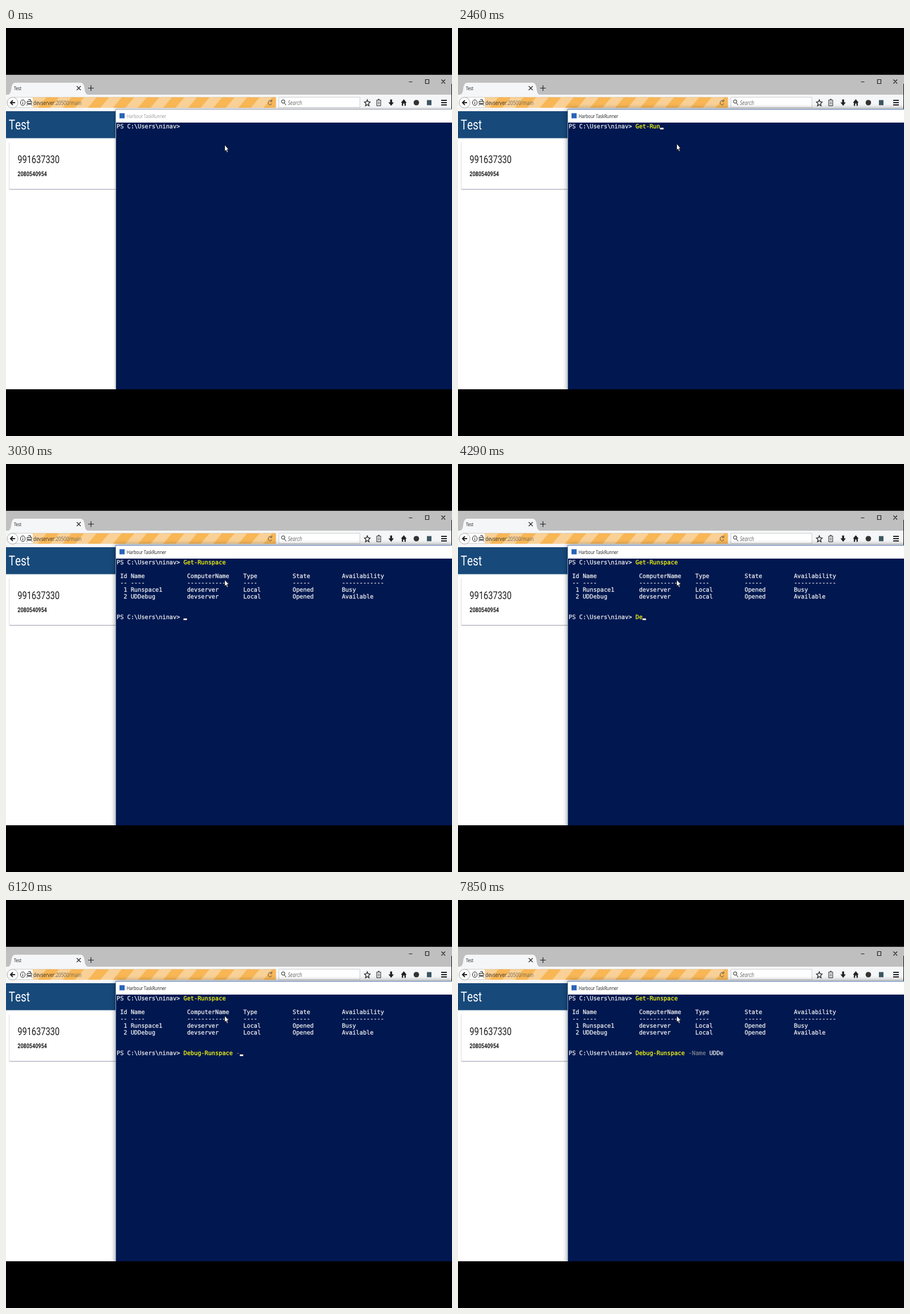
Recreate the animation shown at these times as an HTML page. Size 782 by 716 pixels, loop 8000 ms.

```html
<!DOCTYPE html>
<html lang="en">
<head>
<meta charset="utf-8">
<title>Console beside a browser</title>
<style>
  html, body { margin: 0; width: 100%; height: 100%; overflow: hidden; background: #000; }
  svg { display: block; width: 782px; height: 716px; }
  text { white-space: pre; text-rendering: geometricPrecision; }
  .ui { font-family: "Open Sans", sans-serif; }
  .page { font-family: Roboto, sans-serif; font-kerning: none; }
  .console { font: 10.25px "DejaVu Sans Mono", monospace; fill: #f2f1f0; }
  .console text { stroke: currentColor; stroke-width: .25; color: #f2f1f0; }
  .line { fill: none; stroke: #222; stroke-width: 1.2; }
  .console .command { fill: #ffff10; stroke: #ffff10; }
  .console .option { fill: #7d828c; stroke: #7d828c; }
  #shell { filter: drop-shadow(0 0 2px #0005); }
  #shell.active { filter: drop-shadow(0 0 4px #0007); }
  #frame { fill: #b4b8c2; }
  .active #frame { fill: #7f9cc8; }
  #caption { fill: #999; }
  .active #caption { fill: #1a1a1a; }
</style>
</head>
<body>
<svg viewBox="0 0 782 716">
  <defs>
    <pattern id="stripes" width="44" height="19" patternUnits="userSpaceOnUse" x="451" y="121.5">
      <path fill="#f9d197" d="M0 0h44v19H0z"/>
      <path fill="#f8b655" d="M16 0h22L22 19H0z"/>
    </pattern>
  </defs>

  <!-- browser -->
  <path fill="#bfbfbf" d="M0 82h782v36H0z"/>
  <path fill="#a4a4a4" d="M0 82h782v1H0z"/>
  <path fill="#f5f6f7" d="M0 117h4q4-1 5-9 1-12 7-12h115q6 0 7 12 1 8 5 9h639v29H0z"/>
  <path class="line" d="M124 102l7 7m0-7l-7 7M149 100.5v10m-5-5h10M706.500 94.500h6M763.500 90.500l6.500 7m0-7l-6.500 7M735.500 90.500h6v7h-6z"/>
  <path fill="#fff" stroke="#d0d0d0" d="M12 121.500h461v18H12zM478.500 121.500h142v18h-142z"/>
  <path fill="url(#stripes)" d="M47 121.500h426v18.500H47z"/>
  <circle cx="11.500" cy="131" r="9.500" fill="#fcfcfc" stroke="#aaa"/>
  <path class="line" d="M16 131H8m4-4l-4 4 4 4" style="stroke-width:2"/>
  <g class="line" style="stroke-width:1">
    <ellipse cx="29.500" cy="131" rx="4" ry="5"/>
    <path d="M29.500 130v4m0-6v1M37 128.500h8v4h-8zM39 125.500h4v3M36 136l2-2h6l2 2M39 130.500h1m2 0h1"/>
    <path stroke="#555" d="M465.500 128.500a3.300 4 0 1 0 .5 4m0-7v3.500h-3"/>
    <circle cx="486" cy="129" r="3"/>
    <path d="M488 131.500l3 4M650 126.500h7v10h-7zM652 125h3M651.500 130h4m-4 3h4"/>
    <path style="stroke-width:1.3" d="M633.500 126l1.400 3.500 3.600.4-2.700 2.700.8 3.900-3.100-2-3.100 2 .8-3.900-2.700-2.700 3.600-.4z"/>
  </g>
  <path fill="#222" d="M673.500 125.500h3.500v5h3l-4.700 6-4.800-6h3zM697.500 125l5 6h-1.500v5.500h-2.300v-4h-2.400v4H694V131h-1.500z"/>
  <circle cx="719.500" cy="131" r="4.800" fill="#333"/>
  <path fill="#3c5660" d="M738 126.500h8v9h-8z"/>
  <path class="line" style="stroke-width:2" d="M763 127h10m-10 4h10m-10 4h10"/>
  <path fill="#111" d="M781 98h1v48h-1z"/>

  <!-- page -->
  <path fill="#fff" d="M0 146h782v488H0z"/>
  <path fill="#17497a" d="M0 146h194v47.500H0z"/>
  <path fill="#d9dde2" d="M0 193.500h194v1H0z"/>
  <path fill="#dcdce0" d="M5 201h1v82H5z"/>
  <path fill="#a9a9bc" d="M6 282.500h188v1.300H6z"/>

  <!-- the recording is squeezed sideways as a whole -->
  <g transform="scale(.78 1)">
    <g class="ui">
      <text x="18" y="109" font-size="8.800" fill="#111">Test</text>
      <text x="61.500" y="135" font-size="10.400" fill="#333">devserver<tspan fill="#6b6255">:20500/main</tspan></text>
      <text x="633.500" y="135" font-size="10.800" font-style="italic" fill="#666">Search</text>
    </g>
    <g class="page" fill="#1c1c1c">
      <text x="6" y="178" font-size="24.200" fill="#fff">Test</text>
      <text x="26" y="237" font-size="18.700">991637330</text>
      <text x="26" y="260" font-size="11.500" font-weight="bold">2080540954</text>
    </g>
  </g>

  <!-- console window -->
  <g id="shell">
    <path id="frame" d="M192 142h601v500H192z"/>
    <path fill="#fff" d="M193 143.500h600V166H193z"/>
    <path fill="#001750" d="M193 166h600v476H193z"/>
    <path fill="#2a64b8" d="M199 149.500h9v9h-9z"/>
    <text id="caption" class="ui" transform="scale(.78 1)" x="271.500" y="157.500" font-size="9.200">Harbour TaskRunner</text>
  </g>
  <g class="console">
    <text x="194" y="176">PS C:\Users\ninav&gt; <tspan id="first" class="command"></tspan></text>
    <g id="table"></g>
    <text id="prompt" x="194" y="272">PS C:\Users\ninav&gt; <tspan id="command" class="command"></tspan><tspan id="option" class="option"></tspan><tspan id="value"></tspan></text>
    <rect id="caret" width="6" height="3" fill="#fbf1e6"/>
  </g>
  <path id="pointer" fill="#fff" stroke="#111" stroke-width=".8" d="M0 0v11.500l2.300-2.300 1.800 4.300 1.700-.9-1.700-4.100h2.900z"/>
  <path d="M0 634h782v82H0z"/>
</svg>
<script>
const LOOP = 8000, LEFT = 194, CHAR = 6.17, PROMPT_LENGTH = 19;
const $ = id => document.getElementById(id);

const first = {
  text: 'Get-Runspace',
  times: [1905, 1960, 2015, 2070, 2270, 2365, 2460, 2560, 2620, 2680, 2740, 2800]
};
const second = {
  text: 'Debug-Runspace -Name UDDe',
  times: [4230, 4290, 4450, 4530, 4615, 4700, 4930, 5050, 5110, 5230, 5490, 5490, 5490, 5490,
    6000, 6120, 6250, 6510, 6540, 6570, 6860, 7090, 7390, 7520, 7650]
};
const caretOff = [[0, 1850], [2900, 3030], [3830, 4230], [5890, 6000], [6800, 6860], [7850, LOOP]];

const titles = ['Id', 'Name', 'ComputerName', 'Type', 'State', 'Availability'];
const columns = [1, 4, 20, 36, 50, 64];
const rows = [
  titles,
  titles.map(title => '-'.repeat(title.length)),
  [' 1', 'Runspace1', 'devserver', 'Local', 'Opened', 'Busy'],
  [' 2', 'UDDebug', 'devserver', 'Local', 'Opened', 'Available']
];
$('table').innerHTML = rows.map((row, r) => row.map((cell, c) =>
  `<text x="${LEFT + columns[c] * CHAR}" y="${200 + r * 12}">${cell}</text>`).join('')).join('');

const typed = ({ text, times }, t) => text.slice(0, times.filter(at => at <= t).length);
const show = (id, visible) => $(id).setAttribute('visibility', visible ? 'visible' : 'hidden');

function draw(t) {
  const one = typed(first, t), two = typed(second, t), prompted = t >= 3030;
  $('first').textContent = one;
  $('command').textContent = two.slice(0, 15);
  $('option').textContent = two.slice(15, 21);
  $('value').textContent = two.slice(21);
  show('table', t >= 2960);
  show('prompt', prompted);

  const column = PROMPT_LENGTH + (prompted ? two : one).length;
  $('caret').setAttribute('x', LEFT + column * CHAR);
  $('caret').setAttribute('y', prompted ? 271 : 175);
  show('caret', !caretOff.some(([from, to]) => t >= from && t < to));

  const rise = (t >= 990) + (t >= 1020);
  $('pointer').setAttribute('transform', `translate(383.5 ${205 - rise})`);
  $('shell').classList.toggle('active', t >= 1350);
}

function tick(now) {
  draw(now % LOOP);
  requestAnimationFrame(tick);
}
draw(0);
requestAnimationFrame(tick);
</script>
</body>
</html>
```
